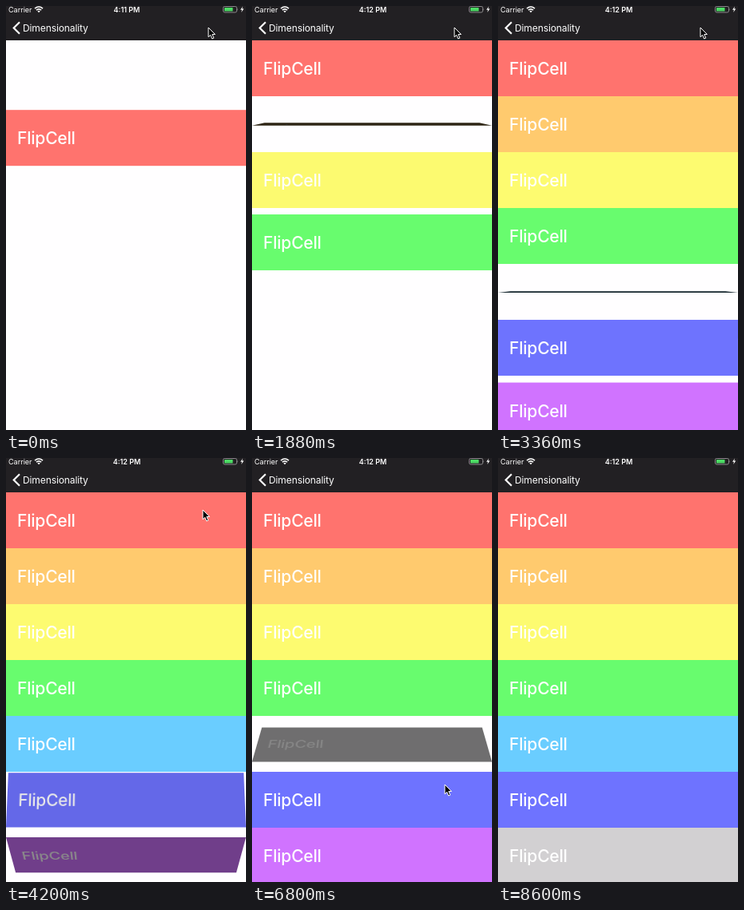
Write an HTML page that moves like this. It is 300 px wide and 531 px high and loops after 8680 ms.

```html
<!DOCTYPE html>
<html lang="en">
<head>
<meta charset="utf-8">
<title>Flipping cells</title>
<style>
html, body { margin: 0; width: 100%; height: 100%; overflow: hidden; background: #fffeff; }
#stage { position: relative; width: 300px; height: 531px; overflow: hidden; background: #fffeff; font-family: Inter, "Liberation Sans", sans-serif; color: #fff; }
.row { position: absolute; left: 0; width: 300px; height: 70px; box-sizing: border-box; padding-left: 14px; font: 500 21px/71px Inter, "Liberation Sans", sans-serif; letter-spacing: -.2px; }
svg { position: absolute; left: 0; top: 0; }
</style>
</head>
<body>
<div id="stage">
  <svg id="top" width="300" height="531" fill="#fff">
    <rect width="300" height="43" fill="#222023"/>
    <text x="3" y="8" font-size="9">Carrier</text>
    <g fill="none" stroke="#fff" stroke-width="1.6">
      <path d="M36 3.2Q41 -1.2 46 3.2M37.9 5.2Q41 2.4 44.1 5.2"/>
    </g>
    <path d="M39.3 6.4Q41 5 42.7 6.4L41 8.2Z"/>
    <text id="clock" x="151" y="8" font-size="9" font-weight="600" text-anchor="middle"></text>
    <rect x="271.5" y=".5" width="17" height="7.5" rx="2" fill="none" stroke="#8b898c"/>
    <rect x="273" y="2" width="10.5" height="4.5" rx=".6" fill="#4cd964"/>
    <path d="M289.5 3q1.2 1.2 0 2.5z" fill="#8b898c"/>
    <path d="M296 .5L293 4.8H295L294.2 8L297.3 3.6H295.2Z"/>
    <path d="M17 20.2L9.7 27.5L17 34.8" fill="none" stroke="#fff" stroke-width="2.2"/>
    <text x="21" y="32" font-size="12" letter-spacing="-.1">Dimensionality</text>
    <path id="cursor" d="M0 0V11.8L2.7 9.3L4.7 14L6.8 13.1L4.8 8.5H8.4Z" fill="#000" stroke="#fff" stroke-width="1"/>
  </svg>
</div>
<script>
const LOOP = 8680, FLIP = 1040, ROW = 70, BAR = 43, HEIGHT = 531;
const colors = ['#ff736e', '#ffca6e', '#fdfb70', '#68fc6e', '#6acdff', '#6e73ff', '#d073ff'];
const taps = [[1, 4540], [4, 6140], [6, 7540]];   // row, time
const path = [[0, 253, 27], [3700, 253, 27], [4200, 246, 65], [4500, 243, 148], [5300, 243, 148],
  [5600, 244, 197], [6050, 242, 358], [6450, 242, 362], [6800, 241, 409], [7400, 240, 498],
  [7900, 240, 500], [8400, 240, 546], [LOOP, 240, 546]];

const $ = id => document.getElementById(id);
const clamp = v => Math.min(1, Math.max(0, v));

// cubic-bezier(.42, 0, .58, 1)
function easeInOut(t) {
  let lo = 0, hi = 1;
  for (let k = 0; k < 20; k++) {
    const s = (lo + hi) / 2, r = 1 - s;
    if (1.26 * r * r * s + 1.74 * r * s * s + s ** 3 < t) lo = s; else hi = s;
  }
  return lo * lo * (3 - 2 * lo);
}

// Critically damped spring towards rest
function slide(ms) {
  const x = Math.max(0, ms) * .0158;
  return HEIGHT * (1 + x) * Math.exp(-x);
}

const rows = colors.map((color, i) => {
  const el = document.createElement('div');
  el.className = 'row';
  el.textContent = 'FlipCell';
  el.style.top = BAR + ROW * i + 'px';
  $('stage').insertBefore(el, $('top'));
  const enter = i ? 5 + 495 * i : -206;
  const flips = [enter + 850, ...taps.filter(tap => tap[0] === i).map(tap => tap[1])];
  return { el, color, enter, flips };
});

function drawRow({ el, color, enter, flips }, t, selected) {
  const start = flips.filter(f => f <= t).pop() ?? t;
  const p = easeInOut(clamp((t - start) / FLIP));
  const angle = p < .5 ? -180 * p : 180 * (1 - p);
  const back = -ROW / 2 * Math.sin(Math.abs(angle) * Math.PI / 180);
  const flip = angle ? ` perspective(600px) translateZ(${back}px) rotateX(${angle}deg)` : '';
  el.style.transform = `translateY(${slide(t - enter).toFixed(2)}px)` + flip;
  el.style.filter = angle ? `brightness(${1 - .85 * Math.abs(angle) / 90})` : 'none';
  el.style.background = selected ? '#d2d0d2' : color;
}

function drawCursor(t) {
  const k = path.findIndex(p => p[0] > t);
  const [t0, x0, y0] = path[k - 1], [t1, x1, y1] = path[k];
  const u = (t - t0) / (t1 - t0);
  $('cursor').setAttribute('transform', `translate(${x0 + (x1 - x0) * u} ${y0 + (y1 - y0) * u})`);
}

function draw(now) {
  const t = now % LOOP;
  const tap = taps.filter(([, at]) => at <= t).pop();
  rows.forEach((row, i) => drawRow(row, t, tap && tap[0] === i));
  drawCursor(t);
  $('clock').textContent = t < 600 ? '4:11 PM' : '4:12 PM';
}

let begin;
function frame(now) {
  begin ??= now;
  draw(now - begin);
  requestAnimationFrame(frame);
}
draw(0);
requestAnimationFrame(frame);
</script>
</body>
</html>
```
